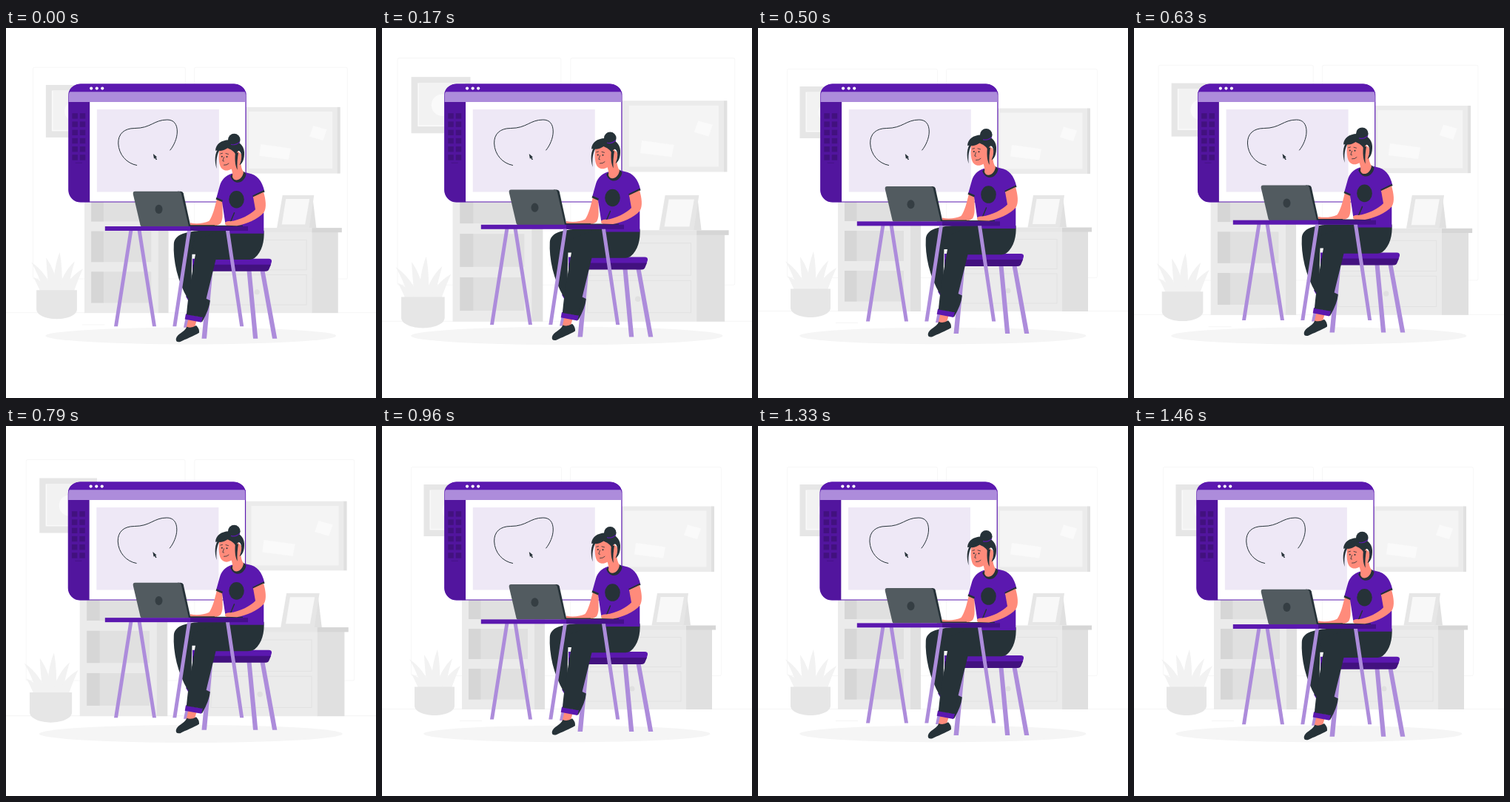
Write an HTML page that moves like this. It is 500 px wide and 500 px high and loops after 1500 ms.

```html
<!DOCTYPE html>
<html lang="en">
<head>
<meta charset="utf-8">
<title>Designer at work</title>
<style>
  html, body { margin: 0; width: 100%; height: 100%; overflow: hidden; background: #fff; }
  svg { display: block; width: 100%; height: 100%; }
  .main { fill: #5b18af; }
  .deep { fill: #42117f; }
  .pale { fill: #ad8cdb; }
  .ink { fill: #263238; }
  .skin { fill: #ff8b7b; }
  .g1 { fill: #ebebeb; }
  .g2 { fill: #e6e6e6; }
  .g3 { fill: #e0e0e0; }
  .g4 { fill: #d6d6d6; }
  .line { fill: none; stroke: #263238; stroke-linecap: round; stroke-linejoin: round; }
</style>
</head>
<body>
<svg viewBox="0 0 500 500" xmlns="http://www.w3.org/2000/svg">
  <g id="room">
    <path d="M0 382.5H500M105 398.5H135" stroke="#f5f5f5" fill="none"/>
    <g fill="#fff" stroke="#f7f7f7">
      <rect x="39.5" y="55.5" width="203" height="282" rx="2"/>
      <rect x="254.5" y="55.5" width="204" height="282" rx="2"/>
    </g>

    <!-- picture -->
    <rect class="g2" x="56.500" y="79" width="73.500" height="70"/>
    <rect x="64.500" y="86.500" width="59" height="54" fill="#fafafa"/>
    <rect x="66" y="86.500" width="57" height="52.500" fill="#f2f2f2"/>
    <circle cx="95" cy="114" r="13.500" fill="#fafafa"/>

    <!-- board -->
    <rect class="g1" x="316" y="108.500" width="129.500" height="88.500"/>
    <rect class="g3" x="445" y="108.500" width="4" height="88.500"/>
    <rect x="327" y="114.500" width="111.500" height="76" fill="#f4f4f4"/>
    <path d="M343 158L383 163.500 380 178.500 341 173.500ZM413 133.500L431 138.500 426 153 408 147.500Z" fill="#fafafa"/>

    <!-- bookcase -->
    <rect class="g1" x="108" y="200" width="98" height="183"/>
    <rect class="g3" x="206" y="200" width="14" height="183"/>
    <g id="shelves"></g>

    <!-- cabinet -->
    <rect class="g1" x="268" y="275" width="143" height="108"/>
    <rect class="g3" x="411" y="275" width="35" height="108"/>
    <rect class="g2" x="264" y="269.500" width="147" height="6"/>
    <rect class="g4" x="411" y="269.500" width="40" height="6"/>
    <g fill="none" stroke="#e2e2e2">
      <rect x="275.500" y="285.500" width="128.500" height="40"/>
      <rect x="275.500" y="332" width="128.500" height="40"/>
    </g>
    <circle class="g3" cx="338" cy="355" r="3.500"/>

    <!-- photo stand -->
    <path class="g3" d="M412 228L417 269.500H406Z"/>
    <path class="g2" d="M372 226H414L407.500 269.500H364.500Z"/>
    <path d="M376.500 231H408L402 265H371Z" fill="#f8f8f8"/>

    <!-- plant -->
    <g id="leaves" fill="#f2f2f2"></g>
    <path class="g2" d="M44 352.500H98V378C98 386 85 391 71 391S44 386 44 378Z"/>
  </g>

  <g id="shade"><ellipse cx="249.800" cy="416" rx="193.700" ry="11.300" fill="#f5f5f5"/></g>

  <g id="app">
    <rect x="85" y="76" width="239.200" height="159" rx="16" fill="#fff" stroke="#5b18af" stroke-width="1.200"/>
    <path class="main" d="M84.800 86.600V92C84.800 83 92 75.800 101 75.800H308C317 75.800 324.500 83 324.500 92V86.600Z"/>
    <path class="main" d="M85 86.600C87 80 93 75.800 101 75.800H308C316 75.800 322 80 324 86.600Z"/>
    <path class="pale" d="M85 100V92Q85 89 86 86.500H323.200Q324 89 324 92V100Z"/>
    <path d="M84.800 100H113.300V235.300H101C92 235.300 84.800 228 84.800 219Z" fill="#52159e"/>
    <g fill="#fff">
      <circle cx="115.300" cy="81.600" r="2.100"/>
      <circle cx="122.900" cy="81.600" r="2.100"/>
      <circle cx="130.400" cy="81.600" r="2.100"/>
    </g>
    <g id="tools" class="deep"></g>
    <rect class="deep" x="94" y="181.800" width="9" height="1.200" opacity=".6"/>
    <rect x="123" y="110" width="165" height="111.500" fill="#eee8f6"/>
    <path class="line" d="M176.800 185.500C163 183 152.500 171 151.900 156C151.500 143 160 135.500 174 135.500C196 135.500 200 124 218 124C227 124 231.500 130 231.500 140C231.500 149 227 159 222 165"/>
    <path class="ink" d="M199 170L200.200 176.800 201.300 175.700 203 178.300 204.300 177.400 202.600 175 204.200 174.400Z"/>
  </g>

  <g id="desk">
    <!-- stool -->
    <g class="pale">
      <path d="M273.500 328H279.500L271 420H264.500Z"/>
      <path d="M325.500 328H331.500L340.300 420H334Z"/>
      <path d="M343.500 328H349.500L366.300 420H360Z"/>
      <path d="M256 328H261L245 405H240Z"/>
    </g>
    <path class="main" d="M252 312H355Q359.500 312 359 316L357.500 321H252Z"/>
    <path class="deep" d="M252 320H358L355.500 326Q354.500 329 351 329H252Z"/>

    <!-- trestle, back part -->
    <g class="pale">
      <path d="M166.500 273H171.500L151 403.500H146Z"/>
      <path d="M177.500 273H182.500L203 403.500H198Z"/>
    </g>

    <!-- legs -->
    <path class="ink" d="M262 362L275.800 368.500Q275 380 265 397.500L259 393Z"/>
    <path class="main" d="M243 363L248.500 359 252 365 247 370Z"/>
    <path class="ink" d="M262 274C240 276 228 280 226.800 292C225.500 314 232 343 245.500 366L252 360C250 342 251 322 251.500 306H290V274Z"/>
    <path class="skin" d="M246.500 393L257.500 396 254.500 406 243.500 406Z"/>
    <path class="main" d="M243 386.500L266 391 264 398 241.700 393.800Z"/>
    <path class="ink" d="M290 274H348.500C349.500 288 346 303 336 311Q333 313.300 326 313.300H283.500L274 352 264.500 391 244 387.500C246 362 251 335 256 306L250 290Z"/>
    <path class="ink" d="M229.800 420C231.500 413 240.500 412 244.500 404Q250 406.500 257 402.300Q261.500 406.500 261 412C254 416.500 242 421 235.500 424.300Q229 425.500 229.800 420Z"/>

    <!-- torso -->
    <path class="skin" d="M285 231L293 234.500C291.500 245 294.500 256 290.500 263.500C287 268.300 276 268.500 270 267.800L249 267V263.500C258 265.500 268 264 274.500 261C279.500 254 282 243 285 231Z"/>
    <path class="main" d="M305 197C296 200 291 206 289 213L284 231 292 235 296 262 303 278H348.300V250L334 229 349.300 221C346 206 339 198.500 328 196.500L322 195Z"/>
    <path d="M284 230.500L292.500 234.200M333.700 228L349 220.500" stroke="#263238" stroke-width="2.600"/>
    <ellipse class="ink" cx="311.500" cy="232" rx="10.300" ry="11.800"/>
    <path class="ink" d="M303 200.500L307 196.500 321 194 324.500 197.500C323 209 309 215 303 200.500Z"/>
    <path class="skin" d="M303.500 188L317 180Q317.500 190 321 195C319 207 308 208.500 306 201.500Q307 196 303.500 188Z"/>

    <!-- head -->
    <path class="skin" d="M288.500 163C286.800 175 287.500 186.500 292 190.500C297 195 305 192.500 309 186.500L313 183C320 181 320.500 170 314.500 168L308 158H292Z"/>
    <circle class="ink" cx="308.300" cy="151.300" r="8.300"/>
    <path class="ink" d="M283 166C283.500 157 291 151.800 301 151.500C313 151.300 321.500 158 322 168C322.300 177 320 183 315.500 185.500C318.800 178 319.500 169.500 315.300 166.500C312.500 165.500 311.800 169 311 173C309 166 303 164.500 299.500 162.500C296 164.500 291 167.500 286.800 165.500Z"/>
    <path d="M304 157.500Q311 159.500 315.800 154" fill="none" stroke="#5b18af" stroke-width="1.200"/>
    <path class="ink" d="M287.500 162C282 169 281.500 180 284.700 190.500C283.800 180 284.500 171 289.500 164ZM310 168C309 176 309.300 186 312.700 192C312 183 312.800 176 314 169Z"/>
    <path class="line" stroke-width=".8" d="M289.800 170.300L292.500 169.500M297 169.800L300.500 170.800M294.500 175L292.800 179.800 294.500 180.300M294.500 185.500Q298.500 186 301 183.300"/>
    <circle class="ink" cx="291.800" cy="174" r="1"/>
    <circle class="ink" cx="298.500" cy="174.300" r="1"/>

    <!-- laptop, tablet -->
    <path class="ink" d="M232 221H236Q239 221 239.700 223.500L249.500 268.500H242Z"/>
    <path d="M174.500 221H233Q236 221 236.800 224L247 268.500H183.500Q182 268.500 181.500 266.500L171.800 225Q171 221 174.500 221Z" fill="#525b60"/>
    <ellipse cx="206.500" cy="245.200" rx="5" ry="6.100" fill="#353e43"/>
    <path class="ink" d="M247 266.500H282V268.500H247ZM282 267H320V268.800H282Z"/>

    <!-- drawing arm -->
    <path class="line" stroke-width="1.500" d="M303.500 262L308.500 250"/>
    <path class="skin" d="M334 228.500L348 222C351 232 352.500 243 348.500 249.500C340 259 325 265 312 267.500L297.500 267C294 264.500 297 260.500 303 261.500C316 260 331 252 337 245.500Z"/>

    <!-- table -->
    <rect class="main" x="133.800" y="268.300" width="193.200" height="6"/>
    <rect x="249" y="268.300" width="78" height="6" fill="#44118a"/>
    <g class="pale">
      <path d="M245 274.300H250L230.300 403.500H225.300Z"/>
      <path d="M297 274.300H302L321.200 403.500H316.200Z"/>
    </g>
  </g>
</svg>
<script>
const LOOP = 1500, STEPS = 36, STEP = LOOP / STEPS;
const $ = id => document.getElementById(id);

const beat = [[0, 1], [.1, 1.1], [.3, 1], [.4, 1], [.5, 1.1], [.6, 1], [1, 1]];
const shake = [0, -1, 2, -4, 4, -4, 4, -4, 2, -1, 0].map((v, i) => [i / 10, v]);
const float = [[0, 0], [.5, -10], [1, 0]];

const box = (x, y, w, h, cls = '') =>
  `<rect class="${cls}" x="${x}" y="${y}" width="${w}" height="${h}"/>`;

function leaf(tx, ty, bx, w) {
  const mx = bx + (tx - bx) * .35, my = 354 + (ty - 354) * .62;
  return `<path d="M${bx - w} 354Q${mx - w} ${my} ${tx} ${ty}Q${mx + w} ${my} ${bx + w} 354Z"/>`;
}

function build() {
  let tools = '', shelves = '';
  for (let r = 0; r < 6; r++)
    for (const x of [89.600, 100]) tools += box(x, 115.200 + r * 11.200, 7.400, 7.400);
  for (const [y, h] of [[220, 41], [274, 41], [328, 41.500]])
    shelves += box(117, y, 80, h, 'g3') + box(117, y, 16.500, h, 'g4');
  $('tools').innerHTML = tools;
  $('shelves').innerHTML = shelves;
  $('leaves').innerHTML = [
    [37, 315, 60, 6], [40, 335, 55, 6], [57, 309, 67, 6],
    [75, 302, 72, 6], [95, 314, 79, 6], [106, 324, 87, 7]
  ].map(a => leaf(...a)).join('');
}

function at(keys, p) {
  const i = keys.findIndex(k => k[0] > p);
  const [p0, v0] = keys[i - 1], [p1, v1] = keys[i];
  return v0 + (v1 - v0) * (p - p0) / (p1 - p0);
}

const zoom = (cx, cy, s) => `translate(${cx} ${cy}) scale(${s}) translate(${-cx} ${-cy})`;

function draw(ms) {
  // 24 pictures a second, each showing the middle of its step
  const p = (Math.floor((ms + 5) / STEP) % STEPS + .5) / STEPS;
  const s = at(beat, p);
  $('room').setAttribute('transform', zoom(250, 226, s));
  $('shade').setAttribute('transform', zoom(249.800, 416, s));
  $('app').setAttribute('transform', `translate(${at(shake, p)} 0)`);
  $('desk').setAttribute('transform', `translate(0 ${at(float, p)})`);
}

build();
const start = performance.now();
function tick(now) {
  draw(Math.max(0, now - start));
  requestAnimationFrame(tick);
}
draw(0);
requestAnimationFrame(tick);
</script>
</body>
</html>
```
